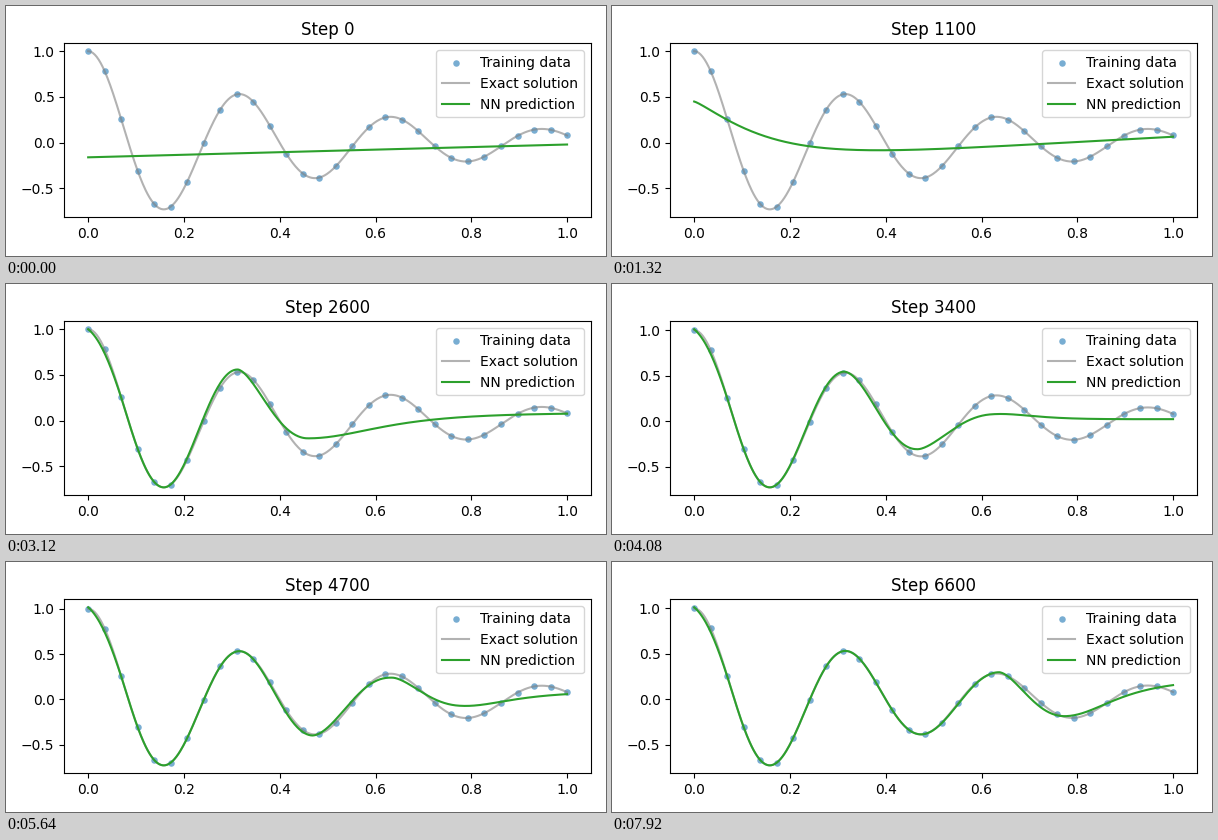
A matplotlib script for the animation above (8000 ms loop, 600 px wide and 250 px high).

```python
import numpy as np
import matplotlib.pyplot as plt
from matplotlib.animation import FuncAnimation

INTERVAL = 40          # ms per drawn frame
FRAMES = 200
HOLD = 3               # drawn frames per training snapshot
DAMPING = 2.0
OMEGA = np.sqrt(20.0**2 - DAMPING**2)
HALF = np.pi / OMEGA   # distance between turning points


def oscillator(x):
    """Underdamped oscillator starting at rest from 1."""
    return np.exp(-DAMPING * x) * (np.cos(OMEGA * x)
                                   + DAMPING / OMEGA * np.sin(OMEGA * x))


def half_wave(u):
    """Shape of one damped swing, from 0 to 1."""
    return (1 - oscillator(u * HALF)) / (1 - oscillator(HALF))


def early(x, bend, level, slope):
    """A line that bends up at the left end."""
    return level + slope * x + bend * np.exp(-(x / 0.15)**1.2)


def learned(x, exact_turns, own_turns, end, tau, lift=0.0, dip=0.33):
    """Exact swings, then own swings, then a tail relaxing to end."""
    turns = [(n * HALF, oscillator(n * HALF)) for n in range(exact_turns)]
    turns += own_turns
    last_x, last_y = turns[-1]
    y = end + (last_y - end) / np.cosh((x - last_x) / tau)
    for i, ((x0, y0), (x1, y1)) in enumerate(zip(turns, turns[1:])):
        part = (x >= x0) & (x < x1)
        u = (x[part] - x0) / (x1 - x0)
        if x1 == last_x and i > 0:
            u = u**0.83        # the newest swing leaves fast, lands slowly
        y[part] = y0 + (y1 - y0) * half_wave(u)
    u = np.clip(x / 0.08, 0, 1)
    return y + (1 - u)**2 * (lift - dip * u)


x = np.linspace(0, 1, 500)
exact = oscillator(x)
x_data = np.linspace(0, 1, 30)

# snapshot number -> prediction at that moment
stages = {
    0: early(x, 0, -0.16, 0.14),
    4: early(x, 0, 0.08, -0.08),
    11: early(x, 0.675, -0.225, 0.29),
    14: learned(x, 0, [(0, 0.82), (0.2, -0.215)], 0.03, 0.1),
    18: learned(x, 0, [(0, 1.025), (0.146, -0.605), (0.34, 0.174)],
                -0.03, 0.127, dip=0.2),
    26: learned(x, 2, [(0.312, 0.56), (0.459, -0.193)], 0.085, 0.13),
    41: learned(x, 3, [(0.467, -0.412), (0.618, 0.195)], -0.03, 0.078, 0.02),
    54: learned(x, 4, [(0.637, 0.297), (0.773, -0.187)], 0.22, 0.09, 0.013),
}
marks = list(stages)


def prediction(k):
    k = min(k, marks[-1])
    j = min(np.searchsorted(marks, k, side="right"), len(marks) - 1)
    a, b = marks[j - 1], marks[j]
    f = (k - a) / (b - a)
    return (1 - f) * stages[a] + f * stages[b]


fig, ax = plt.subplots(figsize=(6, 2.5), dpi=100)
ax.scatter(x_data, oscillator(x_data), s=22, linewidths=0, color="tab:blue",
           alpha=0.6, label="Training data")
ax.plot(x, exact, color="grey", alpha=0.6, label="Exact solution")
line, = ax.plot(x, stages[0], color="tab:green", label="NN prediction")
title = ax.set_title("Step 0")
ax.set_xlim(-0.05, 1.05)
ax.legend(loc="upper right")


def update(frame):
    k = frame // HOLD
    y = prediction(k)
    line.set_ydata(y)
    lo, hi = min(exact.min(), y.min()), max(exact.max(), y.max())
    pad = 0.05 * (hi - lo)
    ax.set_ylim(lo - pad, hi + pad)
    title.set_text(f"Step {100 * k}")
    return line, title


update(0)
fig.tight_layout()
anim = FuncAnimation(fig, update, frames=FRAMES, interval=INTERVAL,
                     repeat=True, repeat_delay=0)
plt.show()
```
